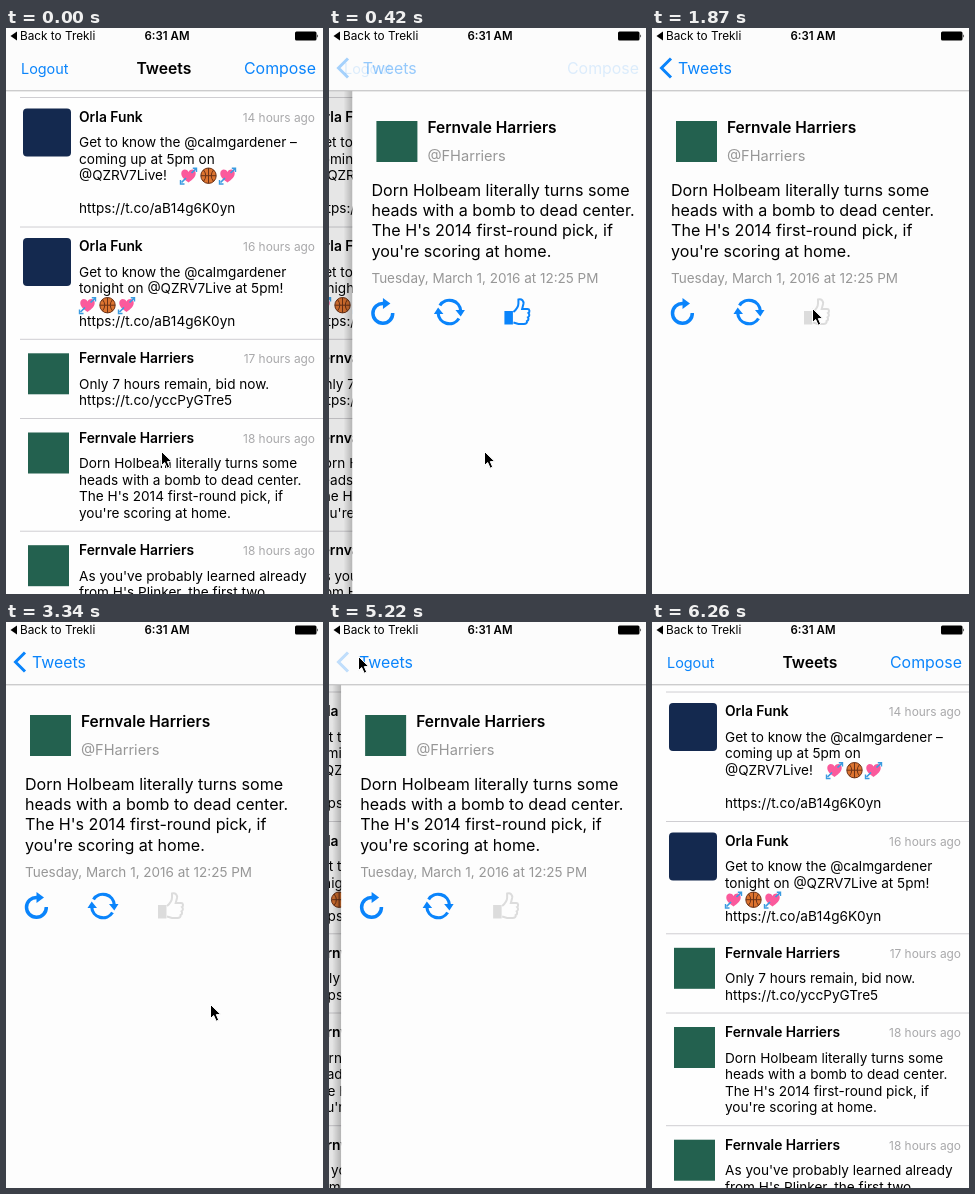
These frames come from a looping animation (317 by 566 pixels, 7.09 s). An HTML page:

```html
<!DOCTYPE html>
<html lang="en">
<head>
<meta charset="utf-8">
<title>Feed</title>
<style>
  html, body { margin: 0; width: 100%; height: 100%; overflow: hidden; background: #fff; }
  svg { display: block; width: 317px; height: 566px; font-family: Inter, Roboto, sans-serif; }
  .body { font-size: 13.6px; }
  .name { font-size: 13.8px; font-weight: 600; }
  .time { font-size: 11.9px; fill: #a9a9ab; text-anchor: end; }
  .big { font-size: 16.1px; }
  .bigName { font-size: 15.5px; font-weight: 600; }
  .handle { font-size: 14.6px; fill: #979797; }
  .date { font-size: 13.5px; fill: #979797; }
  .link { font-size: 15.9px; fill: #0a84fb; }
  .title { font-size: 15.7px; font-weight: 600; }
  .clock { font-size: 11.5px; font-weight: 600; text-anchor: middle; }
  .back { font-size: 11.8px; }
  .line { fill: none; stroke: #0a84fb; }
</style>
</head>
<body>
<svg id="stage" viewBox="0 0 317 566"></svg>
<script>
const LOOP = 7090, W = 317, BLUE = '#0a84fb', GREY = '#dcdcdc';
const PUSH = 169, POP = 5202;

// time, pointer x, pointer y
const steps = [
  [0, 155, 423], [210, 155, 423], [420, 155, 423], [620, 155, 423],
  [830, 154, 347], [1040, 157, 280], [1250, 160, 280], [1450, 160, 280],
  [1660, 160, 280], [1870, 160, 280], [3340, 204, 382], [3540, 218, 404],
  [3750, 218, 408], [3960, 231, 473], [4170, 231, 474], [4380, 32, 160],
  [4590, 0, 15], [4800, 18, 17], [5010, 29, 34], [5220, 29, 34],
  [5420, 128, 235], [5630, 195, 402], [5840, 214, 452], [6050, 281, 554],
  [6260, 330, 600]
];

// time, title, back label, chevron and side button opacity
const fades = [
  [0, 1, 0, 0, 1], [210, .8, .05, .05, .75], [420, 0, .42, .36, .13],
  [620, 0, 1, 1, 0], [5220, 0, 1, .25, 0], [5420, .85, .1, 0, .6], [5630, 1, 0, 0, 1]
];

// time, thumb colour, opacity
const thumbs = [[0, BLUE, 1], [1450, BLUE, .25], [1660, GREY, .6], [1870, GREY, 1]];

const team = 'Fernvale Harriers', band = 'Orla Funk';
const post = ['Dorn Holbeam literally turns some', 'heads with a bomb to dead center.',
  "The H's 2014 first-round pick, if", "you're scoring at home."];
// top, author, hours, lines, emoji place
const rows = [
  [69.5, band, 14, ['Get to know the @calmgardener –', 'coming up at 5pm on', '@QZRV7Live!', '',
    'https://t.co/aB14g6K0yn'], [174, 139]],
  [199, band, 16, ['Get to know the @calmgardener', 'tonight on @QZRV7Live at 5pm!', '',
    'https://t.co/aB14g6K0yn'], [73, 268.5]],
  [311.3, team, 17, ['Only 7 hours remain, bid now.', 'https://t.co/yccPyGTre5']],
  [390.5, team, 18, post],
  [503.2, team, 18, ["As you've probably learned already", "from H's Plinker, the first two"]]
];

const text = (cls, x, y, str) => `<text class="${cls}" x="${x}" y="${y}">${str}</text>`;
const lines = (cls, x, y, gap, list) => list.map((s, i) => text(cls, x, y + i * gap, s)).join('');
const group = (id, content) => `<g id="${id}">${content}</g>`;

const heart = x => `<g transform="translate(${x})">
  <path d="M8.5 15.5C4 12.5 1 9.500 1.300 6 1.600 2 6.500 1.200 8.500 5 10.500 1.200 15.400 2 15.700 6 16 9.500 13 12.500 8.500 15.500Z" fill="#fb5a9c"/>
  <path d="M1.500 15.500 6 11M11.500 6 16 1.800" stroke="#3b9be0" stroke-width="1.700"/>
  <path d="M.5 13V17H4.500M12.800 1.300H16.500V5" fill="none" stroke="#3b9be0" stroke-width="1.400"/></g>`;
const ball = x => `<g transform="translate(${x})" fill="none" stroke="#6b3217">
  <circle cx="8.500" cy="8.700" r="7.700" fill="#dd7430"/>
  <path d="M1 8.700H16M8.500 1V16.400M3.500 3Q8 8.700 3.500 14.400M13.500 3Q9 8.700 13.500 14.400"/></g>`;
const emoji = ([x, y]) => `<g transform="translate(${x} ${y})">${heart(0)}${ball(20)}${heart(39)}</g>`;

const square = (x, y, size, fill, r = 0) =>
  `<rect x="${x}" y="${y}" width="${size}" height="${size}" rx="${r}" fill="${fill}"/>`;

function row([top, author, hours, copy, place]) {
  const mark = author === band ? square(17, top + 11, 48, '#14294f', 4)
                               : square(22, top + 14, 41, '#23614f');
  return `<path d="M14 ${top}H${W + 100}" stroke="#cfced2"/>` + mark +
    text('name', 73, top + 24, author) + text('time', 309, top + 24, hours + ' hours ago') +
    lines('body', 73, top + 49.5, 16.6, copy) + (place ? emoji(place) : '');
}

const replyIcon = `<path class="line" d="M31 275.500A9.900 9.900 0 1 0 40.300 285" stroke-width="3.500"/>
  <path d="M30.500 270V281L38 275.500Z" fill="${BLUE}"/>`;
const repeatIcon = `<path class="line" d="M87.500 277.500A11.300 11.300 0 0 1 108.300 283M106.500 290.500A11.300 11.300 0 0 1 85.700 285" stroke-width="3.200"/>
  <path d="M103 282H112.500L108.300 288.500ZM81.500 286H91L85.700 279.500Z" fill="${BLUE}"/>`;
const thumbIcon = `<path d="M152 283H160.500V296.500H152Z" stroke="none"/>
  <path d="M161 284C164 281.500 166 279 166 275.500V271.500C169.500 270.500 171.500 273 171 276L169.700 281H175C177.500 281 177.500 284 176 285 177.500 286.500 177 288.500 175.500 289.300 176.500 291 176 292.500 174.500 293.200 175 295 173.500 296 171.500 296H166L161 294.500" fill="none" stroke-width="2"/>`;

const detail = `<rect x="-9" y="63" width="9" height="503" fill="url(#edge)"/>
  <rect width="${W}" height="566" fill="#fdfdfd"/>` +
  square(24, 93, 41, '#23614f') + text('bigName', 75, 105, team) + text('handle', 75, 133.3, '@FHarriers') +
  lines('big', 19, 168, 20.2, post) + text('date', 19, 255, 'Tuesday, March 1, 2016 at 12:25 PM') +
  replyIcon + repeatIcon + group('thumb', thumbIcon);

const nav = `<rect width="${W}" height="62.500" fill="#fcfcfc"/><path d="M0 62.800H${W}" stroke="#b8b8ba"/>` +
  group('sides', `<text class="link" x="15" y="46" style="font-size:14.400px">Logout</text>` +
    text('link', 238, 46, 'Compose')) +
  `<path id="chevron" class="line" d="M19 30.500 9.500 40 19 49.500" stroke-width="3"/>` +
  group('title', text('title', 0, 46, 'Tweets')) + group('label', text('link', 0, 46, 'Tweets'));

const status = `<path d="M4.500 8 11 3.500V12.500Z"/>` + text('back', 14, 12, 'Back to Trekli') +
  text('clock', 161, 12, '6:31 AM') +
  `<rect x="289" y="3.500" width="21.500" height="9" rx="1.500"/><path d="M311.300 6.200Q313 8 311.300 9.800Z"/>`;

const pointer = `<path d="M.5 .5V14.500L3.700 11.500 6.200 17.200 8.700 16.100 6.300 10.600H10.800Z" stroke="#fff" stroke-width="1" stroke-linejoin="round"/>`;

const stage = document.getElementById('stage');
stage.innerHTML = `<defs><linearGradient id="edge"><stop stop-opacity="0"/><stop offset="1" stop-opacity=".22"/></linearGradient></defs>
  <rect width="${W}" height="566" fill="#fefefe"/>` +
  group('list', rows.map(row).join('')) + `<rect id="dim" width="${W}" height="566"/>` +
  group('detail', detail) + nav + status + group('pointer', pointer);

const el = {};
stage.querySelectorAll('[id]').forEach(n => el[n.id] = n);
const move = (node, x, y = 0) => node.setAttribute('transform', `translate(${x} ${y})`);
const alpha = (node, a) => node.setAttribute('opacity', a);
const pick = (table, t) => table.reduce((a, b) => b[0] <= t ? b : a);

// critically damped spring, 1 at rest start, 0 at the end
const spring = ms => (1 + .017 * ms) * Math.exp(-.017 * ms);
const pushed = t => t < PUSH ? 0 : t < POP ? 1 - spring(t - PUSH) : spring(t - POP);

function draw(now) {
  const [t, x, y] = pick(steps, now % LOOP);
  const p = pushed(t);
  const [, title, label, chevron, sides] = pick(fades, t);
  const [, colour, strength] = pick(thumbs, t);

  move(el.list, -95 * p, t > POP ? .5 : 0);
  alpha(el.dim, .1 * p);
  move(el.detail, W * (1 - p));
  el.detail.setAttribute('visibility', p < .01 ? 'hidden' : 'visible');
  for (const node of [el.title, el.label]) move(node, 130.5 - 104.5 * p);
  alpha(el.title, title);
  alpha(el.label, label);
  alpha(el.chevron, chevron);
  alpha(el.sides, sides);
  el.thumb.setAttribute('fill', colour);
  el.thumb.setAttribute('stroke', colour);
  alpha(el.thumb, strength);
  move(el.pointer, x, y);
}

const start = performance.now();
function tick() {
  draw(performance.now() - start);
  requestAnimationFrame(tick);
}
tick();
</script>
</body>
</html>
```
